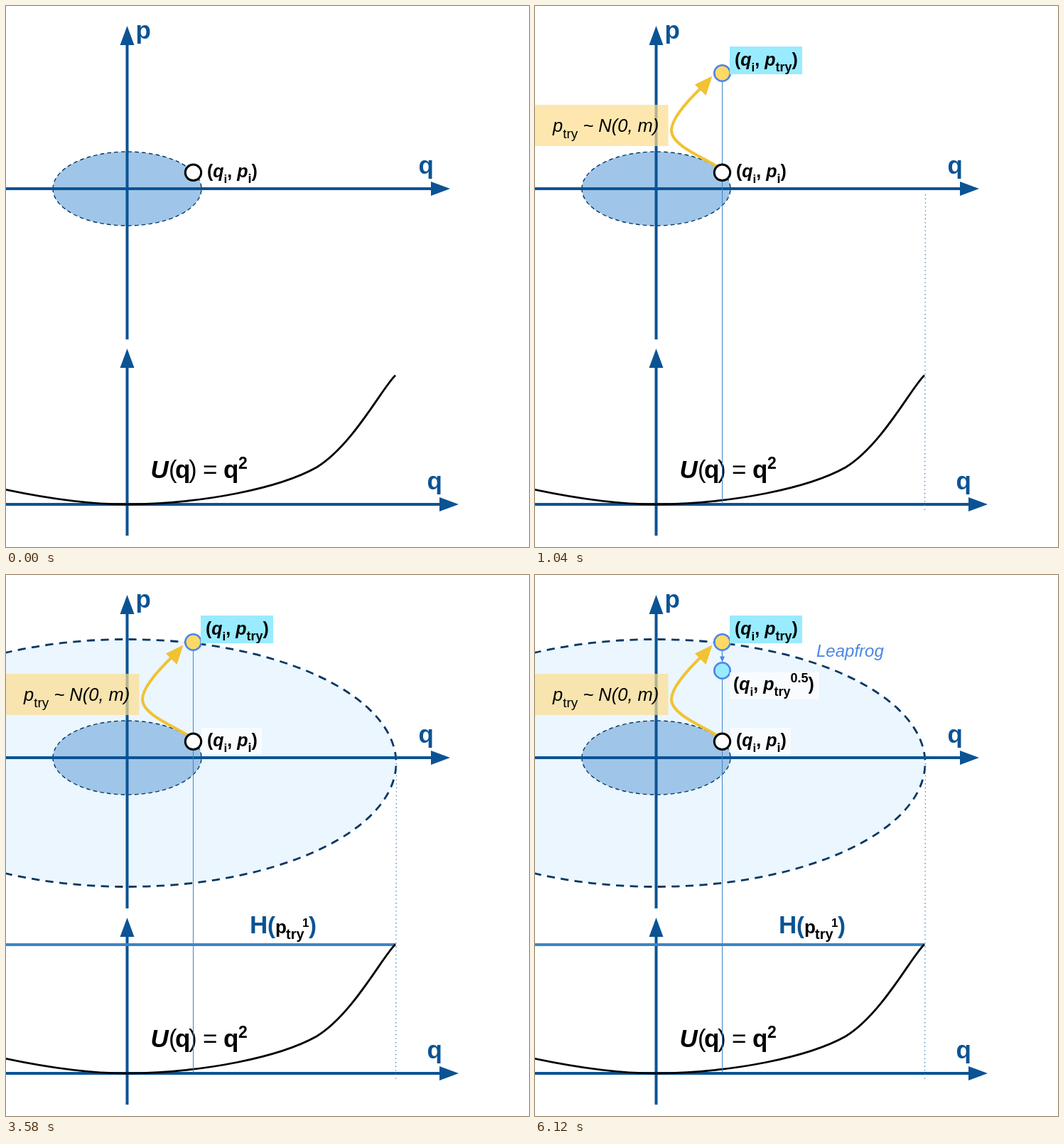
An HTML page for the animation above (8000 ms loop, 736 by 761 pixels).

```html
<!DOCTYPE html>
<html lang="en">
<head>
<meta charset="utf-8">
<style>
  html, body { margin: 0; width: 100%; height: 100%; overflow: hidden; background: #fff; }
  svg { display: block; width: 736px; height: 761px; }
  text { font-family: "Liberation Sans", Arial, sans-serif; white-space: pre; }
  .b { font-weight: 700; }
  .i { font-style: italic; }
  .bi { font-weight: 700; font-style: italic; }
  .axis { stroke: #0b5394; stroke-width: 4; }
  .navy { fill: #0b5394; }
</style>
</head>
<body>
<svg id="stage" viewBox="0 0 736 761"></svg>
<script>
const LOOP = 8000, STEP = 60, STEPS = 10;
const FADES = [500, 3040, 5580];
const CX = 170.5, QX = 263.5;

const line = (x1, y1, x2, y2, attrs) =>
  `<line x1="${x1}" y1="${y1}" x2="${x2}" y2="${y2}" ${attrs}/>`;
const box = (x, y, w, h, fill) =>
  `<rect x="${x}" y="${y}" width="${w}" height="${h}" fill="${fill}"/>`;
const dot = (y, fill, stroke, width) =>
  `<circle cx="${QX}" cy="${y}" r="11.2" fill="${fill}" stroke="${stroke}" stroke-width="${width}"/>`;

// Dashed ellipse, drawn clockwise from its left end
const ellipse = (cy, rx, ry, fill, width) =>
  `<path d="M${CX - rx} ${cy}a${rx} ${ry} 0 0 1 ${2 * rx} 0a${rx} ${ry} 0 0 1 ${-2 * rx} 0z"
    fill="${fill}" stroke="#073763" stroke-width="${width}"
    stroke-dasharray="${4 * width} ${3 * width}"/>`;

const text = (x, y, size, cls, body) =>
  `<text x="${x}" y="${y}" font-size="${size}" class="${cls}">${body}</text>`;
const italic = body => `<tspan font-style="italic">${body}</tspan>`;
// Run on its own baseline, at its own size
const run = (y, size, body) => `<tspan y="${y}" font-size="${size}">${body}</tspan>`;

// Bold label of the form (q_i, p_sub^sup)
function point(x, y, sub, sup = "") {
  return text(x, y, 25, "b",
    "(" + italic("q") + run(y + 8, 17, "i") + run(y, 25, ", " + italic("p")) +
    run(y + 8, 18, sub) + (sup && run(y - 11, 18, sup)) + run(y, 25, ")"));
}

function hAxis(y, end) {
  return line(0, y, end - 25, y, 'class="axis"') +
    `<path class="navy" d="M${end} ${y}l-27 -10v20z"/>`;
}
function vAxis(top, bottom) {
  return line(CX, top + 25, CX, bottom, 'class="axis"') +
    `<path class="navy" d="M${CX} ${top}l10 27h-20z"/>`;
}

function potential() {
  return `<path d="M-20 676C60 694 120 701 170 701C280 700 385 678 437 649C488 618 530 536 548 519.5"
      fill="none" stroke="#000" stroke-width="2.8"/>` +
    text(203.5, 664, 35, "bi", "U") + text(229, 664, 35, "", "(") +
    text(238, 664, 35, "b", "q") + text(257, 664, 35, "", ")") +
    text(277, 664, 35, "", "=") + text(306, 664, 35, "b", "q") +
    text(327, 651, 23, "b", "2");
}

function momentumDraw() {
  return box(0, 139, 187.5, 58, "rgba(252,221,142,.7)") +
    `<path d="M258 227C240 214 192 197 192 175C192 158 214 134 236 113"
      fill="none" stroke="#f1c232" stroke-width="4"/>
    <path d="M249.5 98.5L225 110.5L240.5 126z" fill="#f1c232"/>` +
    dot(94.5, "#ffd966", "#4a86e8", 2.6) +
    box(274, 57, 102, 39, "#99ebff") + point(281, 84, "try") +
    text(25, 177, 25.5, "", italic("p") + run(186, 19, "try") +
      run(177, 25.5, italic(" ~ N(0, m)")));
}

function energyLevel() {
  return line(0, 520, 548, 520, 'stroke="#3d85c6" stroke-width="4"') +
    text(343, 504, 35, "b navy", "H") + text(368, 504, 33, "b navy", "(") +
    text(379, 504, 26, "b", "p") + text(394, 512, 20, "b", "try") +
    text(417, 495, 17, "b", "1") + text(426, 504, 33, "b navy", ")");
}

function halfStep() {
  return line(QX, 106, QX, 117, 'stroke="#4a86e8" stroke-width="1.3"') +
    `<path d="M${QX} 122.5l-3.5 -8h7z" fill="#4a86e8"/>` +
    dot(134.5, "#99ebff", "#4a86e8", 2.6) +
    box(274, 137, 126, 38, "rgba(255,255,255,.7)") +
    point(279, 162, "try", "0.5") +
    `<g fill="#4a86e8">${text(396, 115, 24, "i", "Leapfrog")}</g>`;
}

// Complete picture of one stage, 0 to 3
function scene(n) {
  const from = (stage, part) => n >= stage ? part : "";
  return box(0, 0, 736, 761, "#fff") +
    from(2, ellipse(264.5, 378.5, 174, "#ebf6ff", 2.8)) +
    ellipse(257, 104.5, 52, "#9fc5e8", 1.4) +
    hAxis(257, 625) + vAxis(28, 469) + hAxis(701, 637) + vAxis(482, 745) +
    text(182.5, 46, 35, "b navy", "p") +
    text(580.5, 236, 35, "b navy", "q") +
    text(592.5, 680, 35, "b navy", "q") +
    from(2, energyLevel()) +
    potential() +
    from(1, line(QX, 106, QX, 700, 'stroke="#3d85c6" stroke-width="1"') +
      line(549.5, 265, 548.5, 712, 'stroke="#3d85c6" stroke-width="1.4" stroke-dasharray="1.4 4.2"')) +
    from(2, box(275, 215, 85, 37, "rgba(255,255,255,.7)")) +
    from(1, momentumDraw()) +
    from(3, halfStep()) +
    dot(234.3, "#fff", "#000", 3) + point(283, 241, "i");
}

const stage = document.getElementById("stage");
stage.innerHTML = [0, 1, 2, 3].map(n => `<g opacity="${n ? 0 : 1}">${scene(n)}</g>`).join("");
const layers = [...stage.children].slice(1);

const start = performance.now();
function draw(now) {
  const t = Math.max(0, now - start) % LOOP;
  layers.forEach((layer, n) => {
    const step = Math.floor((t - FADES[n]) / STEP) + 1;
    layer.setAttribute("opacity", Math.min(STEPS, Math.max(0, step)) / STEPS);
  });
  requestAnimationFrame(draw);
}
draw(start);
</script>
</body>
</html>
```
